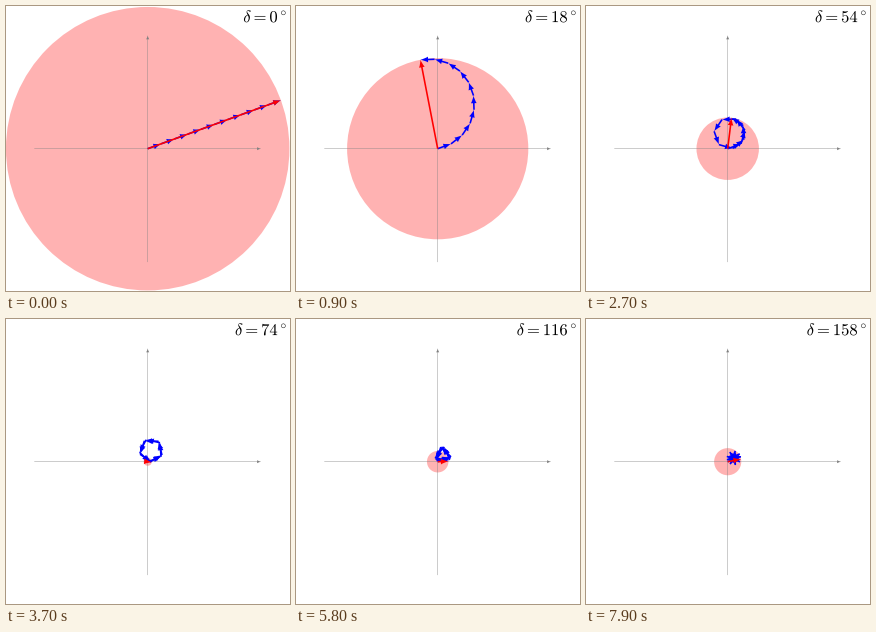
These frames come from a looping animation (284x285 px, 8 s). A matplotlib script:

```python
import matplotlib.pyplot as plt
import numpy as np
from matplotlib.animation import FuncAnimation
from matplotlib.patches import Circle, PathPatch
from matplotlib.path import Path
from matplotlib.textpath import TextPath

plt.rcParams["mathtext.fontset"] = "cm"

W, H, DPI = 284, 285, 72
FRAMES, INTERVAL = 80, 100
CENTER = np.array([141.7, 142.3])
RADIUS, AXIS = 141.73, 113.39
COUNT, PHASE, STEP = 10, 20, 2
UNIT = RADIUS / COUNT
PINK = (1, 0.698, 0.698)

fig = plt.figure(figsize=(W / DPI, H / DPI), dpi=DPI, facecolor="white")
ax = fig.add_axes([0, 0, 1, 1])


def polar(r, deg):
    a = np.radians(deg)
    return r * np.array([np.cos(a), np.sin(a)])


def arrow(start, end, color, width, z):
    """Line with a curved, LaTeX-style head whose size follows the width."""
    d = 0.28 + 0.3 * width
    delta = end - start
    length = np.hypot(*delta)
    u = delta / length if length > 1e-6 else np.array([0.0, 1.0])
    n = np.array([-u[1], u[0]])
    base = end - 9 * d * u
    ax.plot(*zip(start, base), color=color, lw=width,
            solid_capstyle="butt", zorder=z, snap=False)
    shape = d * np.array([(9, 0), (6.333, 0.5), (2, 2), (-1, 3.75),
                          (-1, -3.75), (2, -2), (6.333, -0.5), (9, 0)])
    verts = base + shape[:, :1] * u + shape[:, 1:] * n
    codes = [Path.MOVETO] + [Path.CURVE4] * 3 + [Path.LINETO] + [Path.CURVE4] * 3
    ax.add_patch(PathPatch(Path(verts, codes), fc=color, lw=0, zorder=z))


def label(deg):
    path = TextPath((0, 0), rf"$\delta = {deg}^\circ$", size=16.6)
    shift = np.array([279.6 - path.get_extents().x1, H - 16.2])
    ax.add_patch(PathPatch(Path(path.vertices + shift, path.codes),
                           fc="black", lw=0, zorder=9))


def draw(i):
    ax.clear()
    ax.set(xlim=(0, W), ylim=(0, H))
    ax.axis("off")
    deg = STEP * i
    steps = [polar(UNIT, PHASE + k * deg) for k in range(COUNT)]
    points = CENTER + np.vstack([(0, 0), np.cumsum(steps, axis=0)])
    total = np.hypot(*(points[-1] - CENTER))

    ax.add_patch(Circle(CENTER, total, fc=PINK, lw=0, zorder=1))
    for way in ((AXIS, 0), (0, AXIS)):
        arrow(CENTER - way, CENTER + way, "gray", 0.4, 2)
    for k, (a, b) in enumerate(zip(points, points[1:])):
        arrow(a, b, "blue", 1.6, 3 + 0.1 * k)
    arrow(CENTER, points[-1], "red", 1.6, 5)
    label(deg)
    return []


anim = FuncAnimation(fig, draw, frames=FRAMES, interval=INTERVAL,
                     init_func=lambda: [], repeat=True, repeat_delay=0)
plt.show()
```
